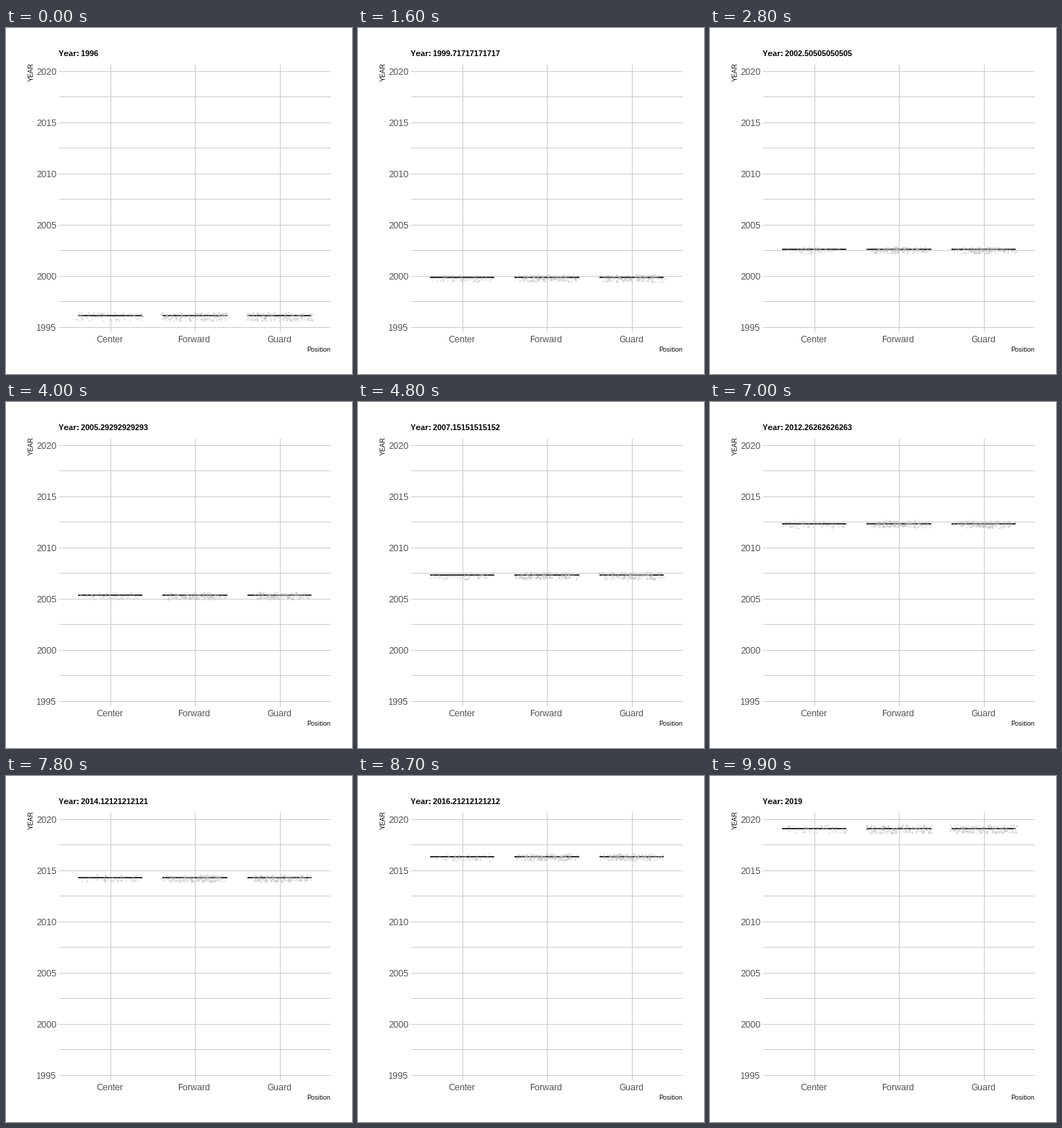
These frames come from a looping animation (480 px wide and 480 px high, 10 s). A matplotlib script:

```python
import numpy as np
import matplotlib.pyplot as plt
from matplotlib.animation import FuncAnimation

SIZE, DPI, FRAMES = 480, 72, 100
FIRST, LAST = 1996, 2019
LEFT, RIGHT, TOP, BOTTOM = 73, 450, 50, 422
UNIT = (RIGHT - LEFT) / 3.2          # width of one category
YEAR_PX = 14.2                       # height of one year
GRID, INK, AXIS = "#cccccc", "#333333", "#4d4d4d"

# name, points in the first year, points in the last year
GROUPS = [("Center", 75, 58), ("Forward", 165, 180), ("Guard", 165, 180)]
CENTERS = [LEFT + UNIT * (0.6 + g) for g in range(3)]

plt.rcParams.update({
    "font.family": "Liberation Sans",
    "text.hinting": "native",
    "text.hinting_factor": 1,
})

rng = np.random.default_rng(1996)


def year_y(year):
    return 414 - (year - 1995) * YEAR_PX


def jitter(year, g):
    """Random offsets of one group's points in a whole year."""
    _, start, end = GROUPS[g]
    count = round(start + (end - start) * (year - FIRST) / (LAST - FIRST))
    count += int(rng.integers(-4, 5))
    return rng.uniform(-0.4, 0.4, (count, 2)) * [UNIT, YEAR_PX]


years = np.arange(FIRST, LAST + 1)
keys = np.round((FRAMES - 1) * (years - FIRST) / (LAST - FIRST))
clouds = [[jitter(int(y), g) for g in range(3)] for y in years]

fig = plt.figure(figsize=(SIZE / DPI, SIZE / DPI), dpi=DPI, facecolor="white")
ax = fig.add_axes([0, 0, 1, 1])
ax.set(xlim=(0, SIZE), ylim=(SIZE, 0))
ax.axis("off")


def label(x, y, text, size, color="black", **kw):
    return ax.text(x, y, text, fontsize=size, color=color,
                   va="baseline", **kw)


def line(xs, ys, width, color, z):
    return ax.plot(xs, ys, lw=width, color=color, zorder=z,
                   solid_capstyle="butt")[0]


for i in range(11):
    y = int(year_y(2020 - 2.5 * i)) + 0.5
    line([LEFT, RIGHT], [y, y], 1, GRID, 1)
    if i % 2 == 0:
        label(70, y + 5.5, str(2020 - 5 * i // 2), 12, AXIS, ha="right")

for (name, _, _), x in zip(GROUPS, (144, 261, 379)):
    line([x + 0.5, x + 0.5], [TOP, BOTTOM], 1, GRID, 1)
    label(x, 436, name, 12, AXIS, ha="center")

label(RIGHT, 449, "Position", 9, ha="right")
label(38, 74, "YEAR", 9, rotation=90, rotation_mode="anchor", ha="left")
title = label(LEFT, 39, "", 11, weight="bold", ha="left")

medians = [line([round(x - 0.375 * UNIT), round(x + 0.375 * UNIT) + 1],
                [0, 0], 2, INK, 2) for x in CENTERS]
dots = ax.scatter([], [], s=2.3 ** 2, color="#bebebe", alpha=0.5, lw=0,
                  zorder=3)


def points(pos, g):
    """Points glide from one year's jitter to the next one's."""
    k = int(pos)
    t = pos - k
    a = clouds[k][g]
    if t > 0:
        b = clouds[k + 1][g]
        n = min(len(a), len(b))
        a = a[:n] * (1 - t) + b[:n] * t
    return a + [CENTERS[g], year_y(FIRST + pos) + 0.5]


def update(i):
    pos = float(np.interp(i, keys, years - FIRST))
    title.set_text(f"Year: {FIRST + (LAST - FIRST) * i / (FRAMES - 1):.15g}")
    y = int(year_y(FIRST + pos))
    for m in medians:
        m.set_ydata([y, y])
    dots.set_offsets(np.vstack([points(pos, g) for g in range(3)]))
    return [title, dots, *medians]


anim = FuncAnimation(fig, update, frames=FRAMES, interval=100, repeat=True,
                     repeat_delay=0, blit=False)
plt.show()
```
